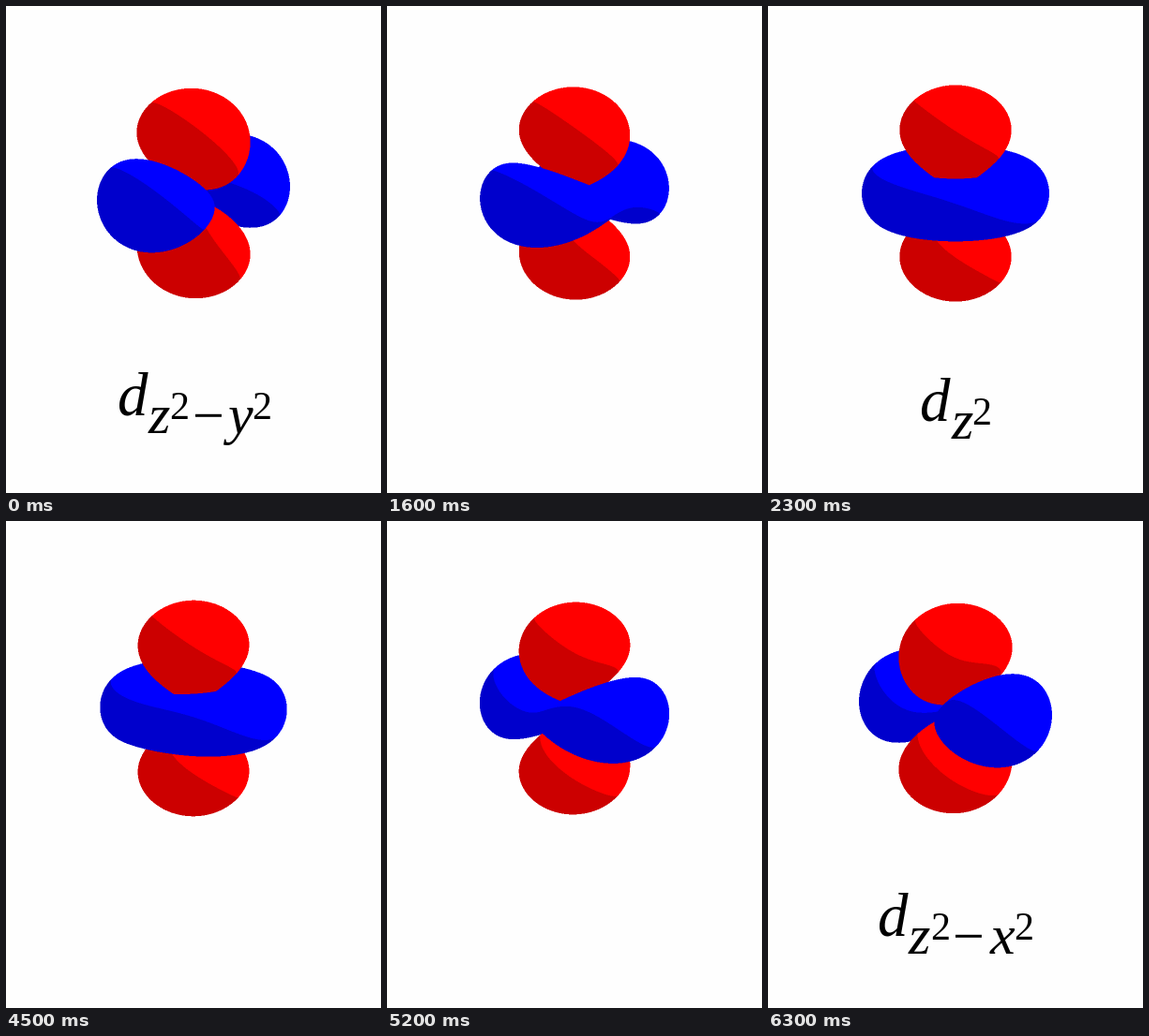
An HTML page with a canvas for the animation above (8000 ms loop, 400 px wide and 520 px high).

```html
<!DOCTYPE html>
<html lang="en">
<head>
<meta charset="utf-8">
<title>d orbitals</title>
<style>
  html, body { margin: 0; width: 100%; height: 100%; overflow: hidden; background: #fefefe; }
  canvas { position: absolute; left: 94px; top: 80px; width: 212px; height: 240px; }
  svg { position: absolute; left: 0; top: 0; }
  text { font-family: "Liberation Serif", "Times New Roman", serif; }
  .v { font-style: italic; font-size: 60px; }
  .d { font-style: italic; font-size: 65px; }
  .n { font-size: 42px; }
  .m { font-size: 60px; }
</style>
</head>
<body>
<canvas width="424" height="480"></canvas>
<svg width="400" height="520">
  <text id="zy" transform="translate(0 -6)">
    <tspan class="d" x="119" y="443">d</tspan><tspan class="v" x="152" y="462">z</tspan><tspan class="n" x="175" y="447">2</tspan><tspan class="m" x="199" y="463">−</tspan><tspan class="v" x="237" y="462">y</tspan><tspan class="n" x="263" y="447">2</tspan>
  </text>
  <text id="zz">
    <tspan class="d" x="162" y="443">d</tspan><tspan class="v" x="196" y="462">z</tspan><tspan class="n" x="218" y="447">2</tspan>
  </text>
  <text id="zx">
    <tspan class="d" x="117" y="443">d</tspan><tspan class="v" x="150" y="462">z</tspan><tspan class="n" x="174" y="447">2</tspan><tspan class="m" x="197" y="463">−</tspan><tspan class="v" x="237" y="462">x</tspan><tspan class="n" x="263" y="447">2</tspan>
  </text>
</svg>
<script>
const LOOP = 8000, STEPS = 19, SCALE = 2;
const TILT = 15 * Math.PI / 180, CT = Math.cos(TILT), ST = Math.sin(TILT);
const DECAY = 17, LEVEL = 0.0483, REACH = 122, STRIDE = 4;
const SHADE = 0.05;

const canvas = document.querySelector('canvas');
const ctx = canvas.getContext('2d');
const img = ctx.createImageData(canvas.width, canvas.height);
const pixels = new Uint32Array(img.data.buffer);
const RED = [0xff0000cc, 0xff0000ff], BLUE = [0xffcc0000, 0xffff0000]; // ABGR: dark, lit

// The surface is |P| * exp(-r / DECAY) = const; limit[r²] is the |P| needed there.
const limit = Float32Array.from({ length: REACH * REACH + 2 },
  (_, r2) => LEVEL * DECAY * DECAY * Math.exp(Math.sqrt(r2) / DECAY));

// Camera coordinates (right, up, towards the viewer) to orbital axes.
function toWorld(right, up, depth) {
  const h = depth * CT - up * ST;
  return [(right + h) * Math.SQRT1_2, (h - right) * Math.SQRT1_2, up * CT + depth * ST];
}
const light = toWorld(0.7, 0.7, -0.04);
const view = toWorld(0, 0, 1);

// P = cz z² - cx x² - cy y²
function drawOrbital(cx, cy, cz) {
  const c = [-cx, -cy, cz];
  const form = (a, b) => c[0] * a[0] * b[0] + c[1] * a[1] * b[1] + c[2] * a[2] * b[2];
  const q2 = form(view, view);

  function trace(right, up) {
    const flat = right * right + up * up;
    if (flat >= REACH * REACH) return 0;
    const base = toWorld(right, up, 0);
    const q0 = form(base, base), q1 = 2 * form(base, view);
    const inside = d => Math.abs(q0 + d * (q1 + d * q2)) > limit[(flat + d * d) | 0];

    const far = Math.sqrt(REACH * REACH - flat);
    let d = far;
    while (d > -far && !inside(d)) d -= STRIDE;
    if (d <= -far) return 0;
    let lo = d, hi = d + STRIDE;
    for (let i = 0; i < 6; i++) {
      const mid = (lo + hi) / 2;
      if (mid < far && inside(mid)) lo = mid; else hi = mid;
    }

    const p = toWorld(right, up, lo);
    const value = form(p, p), sign = Math.sign(value);
    const pull = Math.abs(value) / (DECAY * Math.hypot(...p));
    let dot = 0, len = 0;
    for (let i = 0; i < 3; i++) {
      const n = p[i] * (pull - 2 * sign * c[i]);
      dot += n * light[i];
      len += n * n;
    }
    return (sign > 0 ? RED : BLUE)[+(dot > SHADE * Math.sqrt(len))];
  }

  const { width, height } = canvas;
  for (let j = 0, k = 0; j < height; j++)
    for (let i = 0; i < width; i++, k++)
      pixels[k] = trace((i + 0.5 - width / 2) / SCALE, (height / 2 - j - 0.5) / SCALE);
  ctx.putImageData(img, 0, 0);
}

// Ticks from a given start, held at the last step.
const ticks = (t, start) => Math.max(0, Math.min(STEPS, Math.floor((t - start) / 100) + 1));

const labels = { zy: [0, 500], zz: [2300, 4500], zx: [6300, LOOP] };
let shown;

function frame(now) {
  const t = now % LOOP;
  const toRing = ticks(t, 500), fromRing = ticks(t, 4500);
  const pose = toRing + fromRing;
  if (pose !== shown) {
    shown = pose;
    const ring = ((toRing - fromRing) / STEPS) ** 2;
    const weak = 0.5 * ring, strong = 0.866 - 0.366 * ring, polar = 0.866 + 0.134 * ring;
    if (fromRing) drawOrbital(strong, weak, polar);
    else drawOrbital(weak, strong, polar);
  }
  for (const id in labels) {
    const [from, to] = labels[id];
    document.getElementById(id).style.display = t >= from && t < to ? '' : 'none';
  }
  requestAnimationFrame(frame);
}
requestAnimationFrame(frame);
</script>
</body>
</html>
```
